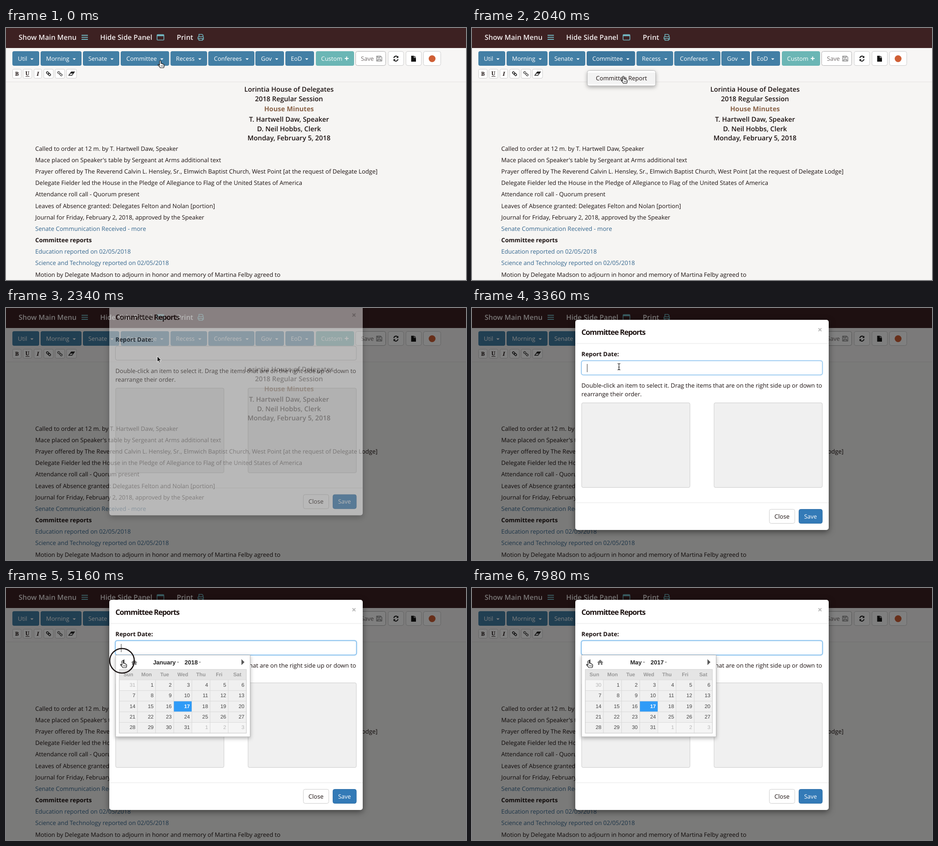
Recreate the animation shown at these times as an HTML page. Size 1011x554 px, loop 8 s.

```html
<!DOCTYPE html>
<html lang="en">
<head>
<meta charset="utf-8">
<title>Committee report dialog</title>
<style>
html, body { margin: 0; width: 100%; height: 100%; overflow: hidden; background: #f6f5f3; }
svg { display: block; width: 1011px; height: 554px; }
text { font: 13.09px "Open Sans", "Noto Sans", sans-serif; fill: #1c1211; text-rendering: geometricPrecision; white-space: pre; }
.menu { font-size: 15.35px; font-weight: 600; fill: #f4efef; }
.head { font-size: 14.75px; font-weight: 600; text-anchor: middle; }
.brown { font-size: 14.6px; font-weight: 700; fill: #8a6449; }
.bold { font-weight: 700; }
.link { fill: #35678f; }
.white { font-size: 12.95px; font-weight: 500; fill: #fff; }
.mid { text-anchor: middle; }
.serif { font: 700 12px "Noto Serif", "Liberation Serif", serif; text-anchor: middle; }
.italic { font-style: italic; }
.title { font-size: 16.2px; font-weight: 700; letter-spacing: -1px; }
.cal text { font: 11.4px "Liberation Sans", Arial, sans-serif; fill: #444; }
.cal .month { font-size: 13px; font-weight: 700; fill: #222; }
.cal .day { font-weight: 700; fill: #999; text-anchor: middle; }
.cal .num { text-anchor: end; }
.cal .out { fill: #b5b5b5; }
.cal .picked { font-weight: 700; fill: #fff; }
.soft { filter: drop-shadow(0 3px 4px rgba(0, 0, 0, .3)); }
.deep { filter: drop-shadow(0 4px 7px rgba(0, 0, 0, .5)); }
</style>
</head>
<body>
<svg id="stage" viewBox="0 0 1011 554" xmlns="http://www.w3.org/2000/svg"></svg>
<script>
const LOOP = 8000;
const stage = document.getElementById('stage');

// Markup helpers
const box = (x, y, w, h, fill, stroke = 'none', r = 0, extra = '') =>
  `<rect x="${x}" y="${y}" width="${w}" height="${h}" rx="${r}" fill="${fill}" stroke="${stroke}" ${extra}/>`;
const label = (x, y, text, cls = '') => `<text x="${x}" y="${y}" class="${cls}">${text}</text>`;
const path = (d, fill, stroke = 'none', width = 1) =>
  `<path d="${d}" fill="${fill}" stroke="${stroke}" stroke-width="${width}"/>`;
const group = (id, body, extra = '') => `<g id="${id}" ${extra}>${body}</g>`;
const at = (x, y, body) => `<g transform="translate(${x} ${y})">${body}</g>`;
const caret = (x, y, size, fill) =>
  path(`M${x - size} ${y - size / 2}h${2 * size}l${-size} ${size}z`, fill);

function header() {
  const teal = '#70b3bd';
  return box(0, 0, 1011, 44, '#3d2122') +
    label(27.8, 26, 'Show Main Menu', 'menu') +
    label(207, 26, 'Hide Side Panel', 'menu') +
    label(375.3, 26, 'Print', 'menu') +
    path('M166 16h14M166 20.5h14M166 25h14', 'none', teal, 2) +
    box(332, 14.5, 15, 12, 'none', teal, 1.5, 'stroke-width="1.6"') + box(332, 14, 15, 4, teal) +
    path('M424 19v-5h7l2 2v3M422 25v-4q0-2 2-2h8q2 0 2 2v4h-2M424 23h8v4h-8z', 'none', teal, 1.6);
}

function toolbar() {
  const drops = [
    ['Util', 14, 59, 26], ['Morning', 76, 90, 88], ['Senate', 169, 80, 181],
    ['Committee', 252, 106.5, 264.5], ['Recess', 361.5, 80.5, 373.5], ['Conferees', 444.5, 101.5, 457],
    ['Gov', 548, 63, 560.5], ['EoD', 614, 63, 626]
  ];
  let out = box(0, 44, 1011, 74, '#f7f6f5') + path('M0 118.5H1011', 'none', '#e4e2e1');
  for (const [name, x, w, tx] of drops) {
    out += box(x, 51, w, 32, '#437fa5', 'none', 4, `id="b${name}"`) +
      label(tx, 72, name, 'white') + caret(x + w - 16, 68.5, 3.5, '#fff');
  }
  out += box(681, 51, 84, 32, '#6bb6b5', 'none', 4) + label(692.5, 72, 'Custom', 'white') +
    path('M744.5 67h8.5M748.7 62.8v8.5', 'none', '#fff', 2);
  for (const [x, w] of [[768, 67], [839.5, 35], [878.5, 35], [917, 39]]) {
    out += box(x + .5, 51.5, w - 1, 31, '#fff', x === 768 ? '#b0b0b0' : '#ccc', 4);
  }
  out += `<g opacity=".62">${label(780, 72, 'Save')}` +
    path('M814.5 62h9l2.5 2.5v8h-11.5zM817 62v3.5h5V62M817 72.5V69h6.5v3.5', 'none', '#333', 1.3) + '</g>';
  out += path('M852.5 66a4.7 4.7 0 0 1 8.2-2.6M861.5 68.5a4.7 4.7 0 0 1-8.2 2.6', 'none', '#111', 1.9) +
    path('M862.3 61.2v4.6h-4.6zM851.7 73.2v-4.6h4.6z', '#111') +
    path('M890.5 61h6v4.5h4.5v8.5h-10.5z', '#111') + path('M897.5 61l3.5 3.5h-3.5z', '#111') +
    '<circle cx="936.5" cy="67.5" r="7.5" fill="#cf5f35"/>';
  return out + formatButtons();
}

function formatButtons() {
  let out = '';
  for (const [x, w] of [[14, 20], [37, 20.5], [61, 18], [82.5, 22], [107.5, 22], [132.5, 23]]) {
    out += box(x + .5, 90.5, w - 1, 20, '#fff', '#ccc', 3);
  }
  const links = (gap, width) => {
    const link = x => box(x, -2, 6, 4, 'none', '#222', 2, `stroke-width="${width}"`);
    return `<g transform="rotate(42)">${link(-5.5 - gap)}${link(-.5 + gap)}</g>`;
  };
  return out + label(24, 105, 'B', 'serif') +
    label(47, 104, 'U', 'serif') + path('M43 106.5h8.5', 'none', '#261b1a') +
    label(70, 105, 'I', 'serif italic') +
    at(93.5, 100.5, links(0, 1.5)) +
    at(118.5, 100.5, links(.8, 1) + path('M-5-2h2M-2-5v2M5 2h-2M2 5v-2', 'none', '#222', .8)) +
    path('M138 104l5.5-7.5h7l-5.5 7.5z', '#fff', '#222', 1.3) +
    path('M140.8 100.2l2.7-3.7h7l-2.7 3.7z', '#222');
}

function minutes() {
  const heads = [
    ['Lorintia House of Delegates', 140], ['2018 Regular Session', 161], ['House Minutes', 183, 'brown'],
    ['T. Hartwell Daw, Speaker', 206], ['D. Neil Hobbs, Clerk', 226.5], ['Monday, February 5, 2018', 247]
  ];
  const lines = [
    ['Called to order at 12 m. by T. Hartwell Daw, Speaker'],
    ["Mace placed on Speaker's table by Sergeant at Arms additional text"],
    ['Prayer offered by The Reverend Calvin L. Hensley, Sr., Elmwich Baptist Church, West Point [at the request of Delegate Lodge]'],
    ['Delegate Fielder led the House in the Pledge of Allegiance to Flag of the United States of America'],
    ['Attendance roll call - Quorum present'],
    ['Leaves of Absence granted: Delegates Felton and Nolan [portion]'],
    ['Journal for Friday, February 2, 2018, approved by the Speaker'],
    ['Senate Communication Received - more', 'link'],
    ['Committee reports', 'bold'],
    ['Education reported on 02/05/2018', 'link'],
    ['Science and Technology reported on 02/05/2018', 'link'],
    ['Motion by Delegate Madson to adjourn in honor and memory of Martina Felby agreed to']
  ];
  return heads.map(([text, y, cls = '']) => label(622, y, text, 'head ' + cls)).join('') +
    lines.map(([text, cls], i) => label(64.3, 269.6 + 25.18 * i, text, cls)).join('');
}

function dropdown() {
  return box(253.5, 93.5, 150, 33.5, '#fff', '#bbb', 4, 'class="soft"') +
    box(254, 98, 149, 25, '#f3f3f3', 'none', 0, 'id="hover"') + label(272.3, 115, 'Committee Report');
}

function modal() {
  return box(227, 26, 557, 462, '#fff', 'none', 5, 'class="deep"') +
    label(240.5, 58.5, 'Committee Reports', 'title') +
    path('M761.5 44.5l6.5 6.5M768 44.5l-6.5 6.5', 'none', '#b9b9b9', 2) +
    path('M227 78H784M227 428H784', 'none', '#e5e5e5') +
    label(240.5, 106, 'Report Date:', 'bold') +
    box(240.5, 116, 529.5, 31, 'none', '#66afe9', 4, 'id="glow" stroke-width="4" opacity="0"') +
    box(240.5, 116, 529.5, 31, '#fff', '#ccc', 4, 'id="field"') +
    box(252.7, 123, 1, 18, '#333', 'none', 0, 'id="bar"') +
    label(240.5, 175, 'Double-click an item to select it. Drag the items that are on the right side up or down to') +
    label(240.5, 194, 'rearrange their order.') +
    box(241, 208.5, 238, 186, '#f0f0f0', '#ccc', 3) + box(532, 208.5, 238, 186, '#f0f0f0', '#ccc', 3) +
    box(653.5, 442.5, 56, 31, '#fff', '#ccc', 4) + label(681.3, 462.5, 'Close', 'mid') +
    box(718.5, 442.5, 51.5, 31, '#337ab7', '#2e6da4', 4) + label(744, 462.5, 'Save', 'mid white');
}

// Calendar page for a month counted from year 0
function calendar(index) {
  const year = Math.floor(index / 12), month = index % 12;
  const first = new Date(year, month, 1).getDay();
  const days = new Date(year, month + 1, 0).getDate();
  const rows = Math.ceil((first + days) / 7);
  const name = new Date(year, month, 1).toLocaleString('en-US', { month: 'long' });
  const cw = 39.9, rh = 23.4, x0 = 249, y0 = 202, bottom = y0 + rows * rh;
  let out = box(241, 147.5, 295.5, bottom + 8 - 147.5, '#fff', '#bbb', 0, 'class="soft"') +
    path('M253.5 163l6.5-6.5v13z', '#222') + path('M517.5 156.5v13l6.5-6.5z', '#555') +
    path('M275 164l6.8-6.5 6.8 6.5h-2v5h-3.3v-4h-3v4H277v-5z', '#777') +
    `<text x="373" y="167.5" class="month" text-anchor="end">${name}</text>` + caret(378, 163.5, 2.5, '#888') +
    label(392.5, 167.5, year, 'month') + caret(426, 163.5, 2.5, '#888') +
    box(x0, 179, 7 * cw, 23, '#e5e5e5');
  ['Sun', 'Mon', 'Tue', 'Wed', 'Thu', 'Fri', 'Sat'].forEach((day, i) => {
    out += label(x0 + cw * (i + .5), 194, day, 'day');
  });
  for (let i = 0; i < rows * 7; i++) {
    const n = i - first + 1, x = x0 + cw * (i % 7), y = y0 + rh * Math.floor(i / 7);
    const outside = n < 1 || n > days, picked = n === 17;
    out += box(x, y, cw, rh, picked ? '#2f9bf7' : outside ? '#f5f5f5' : '#f0f0f0', '#d9d9d9', 0, 'stroke-width=".9"') +
      label(x + cw - 4.5, y + 14.7, new Date(year, month, n).getDate(),
        'num' + (picked ? ' picked' : outside ? ' out' : ''));
  }
  return out + box(x0, 179, 7 * cw, bottom - 179, 'none', '#d0d0d0');
}

const cursors =
  group('hand', path('M-1.5 1.5q1.5-2.5 3 0v5q3-.5 3.2 1q2.5-.3 2.6 1.3q1.6 0 1.6 2q0 3-1.4 5.2h-7.5q-2-3.6-5-6q.2-2 2-1l1.5 1.4z', '#fff', '#111', 1.2) +
    path('M2 10.5v3M4.2 10.5v3M6.4 10.5v3', 'none', '#111', .8)) +
  group('arrow', path('M0 0v13l3-2.8 2 4.6 2-.9-2-4.5h4z', '#111', '#fff')) +
  group('beam', path('M-3-7q3 0 3 2v10q0 2-3 2M3-7q-3 0-3 2v10q0 2 3 2M-1.5 1h3', 'none', '#111', 1.1));

stage.innerHTML = box(0, 0, 1011, 554, '#f6f5f3') + header() + toolbar() + minutes() +
  group('drop', dropdown()) + box(0, 0, 1011, 554, '#000', 'none', 0, 'id="dim"') +
  group('modal', modal()) + group('cal', '', 'class="cal"') +
  '<circle id="ring" r="27" fill="none" stroke="#1d1717" stroke-width="2.6"/>' +
  group('cursor', cursors);

const el = id => document.getElementById(id);
const set = (id, name, value) => el(id).setAttribute(name, value);
const show = (id, on) => set(id, 'visibility', on ? 'visible' : 'hidden');
const ramp = (t, a, b) => Math.min(1, Math.max(0, (t - a) / (b - a)));
const smooth = k => k * k * (3 - 2 * k);

// Pointer stops: time, x, y
const stops = [[0, 339, 71.5], [1000, 339, 71.5], [1500, 332.5, 105.5], [2300, 332.5, 105.5],
  [2900, 323, 129], [3700, 323, 129], [4500, 256.5, 159], [LOOP, 256.5, 159]];
const FIRST_CLICK = 5100, CLICK_GAP = 240, CLICKS = 9;
const clicks = [[780, 900], [2090, 2150], [3180, 3300]];
for (let i = 0; i < CLICKS; i++) {
  const start = FIRST_CLICK + i * CLICK_GAP;
  clicks.push([start, start + 130]);
}

function pointer(t) {
  const i = stops.findIndex(s => s[0] > t);
  const a = stops[i - 1], b = stops[i], k = smooth(ramp(t, a[0], b[0]));
  return [a[1] + (b[1] - a[1]) * k, a[2] + (b[2] - a[2]) * k];
}

let shownMonth = -1;

function draw(t) {
  const [x, y] = pointer(t);
  const shape = t < 2150 ? 'hand' : t < 2650 ? 'arrow' : t < 4150 ? 'beam' : t < 4400 ? 'arrow' : 'hand';
  ['hand', 'arrow', 'beam'].forEach(id => show(id, id === shape));
  set('cursor', 'transform', `translate(${x} ${y})`);
  set('ring', 'cx', x - 1.5);
  set('ring', 'cy', y + 1);
  show('ring', clicks.some(([a, b]) => t >= a && t < b));

  const open = t >= 900 && t < 2130;
  show('drop', open);
  show('hover', open && y > 94);
  set('bCommittee', 'fill', open ? '#3c769d' : '#437fa5');

  set('dim', 'opacity', .5 * ramp(t, 2080, 2170));
  const enter = ramp(t, 2200, 2500), slide = (1 - enter) ** 2;
  set('modal', 'opacity', enter);
  set('modal', 'transform', `translate(0 ${-115 * slide})`);

  const focus = ramp(t, 3300, 3450);
  set('glow', 'opacity', .45 * focus);
  set('field', 'stroke', focus > 0 ? '#66afe9' : '#ccc');
  show('bar', t >= 3300 && (t - 3300) % 600 < 300);

  const back = Math.min(CLICKS, Math.max(0, Math.floor((t - FIRST_CLICK) / CLICK_GAP) + 1));
  const month = 2018 * 12 + 1 - back;
  if (month !== shownMonth) {
    el('cal').innerHTML = calendar(month);
    shownMonth = month;
  }
  set('cal', 'opacity', ramp(t, 3450, 3600));
}

const begin = performance.now();
function tick() {
  draw((performance.now() - begin) % LOOP);
  requestAnimationFrame(tick);
}
tick();
</script>
</body>
</html>
```
